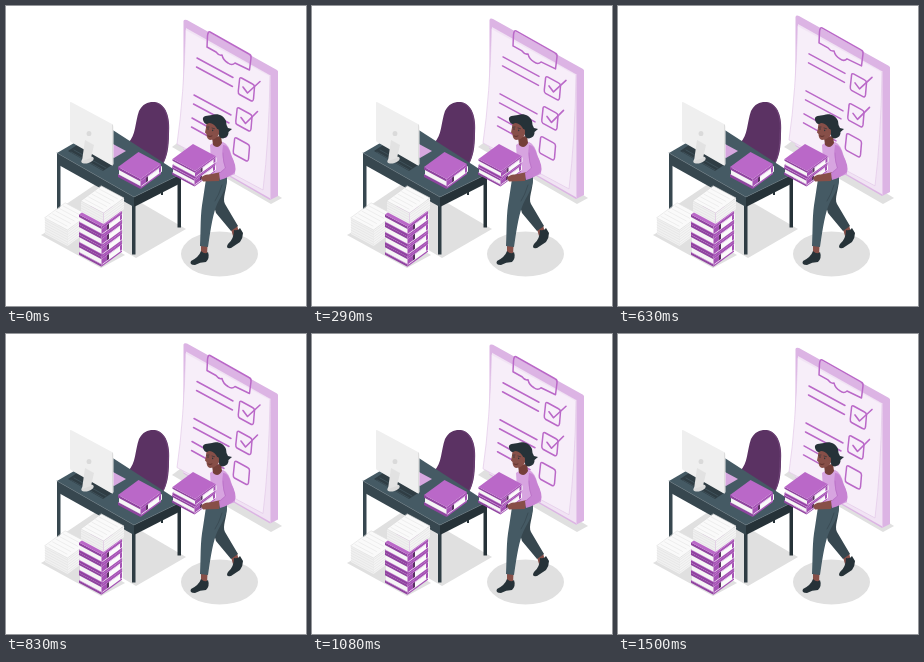
Recreate the animation shown at these times as an HTML page with a canvas. Size 300 by 300 pixels, loop 1.54 s.

```html
<!DOCTYPE html>
<html lang="en">
<head>
<meta charset="utf-8">
<title>Office tasks</title>
<style>
html, body { margin: 0; width: 100%; height: 100%; overflow: hidden; background: #fff; }
canvas { display: block; width: 100vw; height: 100vh; }
</style>
</head>
<body>
<canvas id="stage"></canvas>
<script>
const canvas = document.getElementById('stage');
const ctx = canvas.getContext('2d');
const LOOP = 1540, STEPS = 37, LIFT = 4.5;
const PURPLE = '#ba68c8', DEEP = '#8f449f', DARK = '#263238', SLATE = '#455a64';
const SKIN = '#874f48', SHADOW = '#e0e0e0';

function fill(d, color) {
  ctx.fillStyle = color;
  ctx.fill(new Path2D(d));
}

function stroke(d, color, width = 1) {
  ctx.strokeStyle = color;
  ctx.lineWidth = width;
  ctx.stroke(new Path2D(d));
}

function ellipse(x, y, rx, ry, color, turn = 0) {
  ctx.fillStyle = color;
  ctx.beginPath();
  ctx.ellipse(x, y, rx, ry, turn, 0, Math.PI * 2);
  ctx.fill();
}

// Isometric box; x, y is the left corner of its top.
function box(x, y, h, top, left, right) {
  ctx.save();
  ctx.translate(x, y);
  fill(`M0 0L22.5 12V${12 + h}L0 ${h}Z`, left);
  fill(`M22.5 12L43 -3V${h - 3}L22.5 ${12 + h}Z`, right);
  fill('M0 0L20.5 -15L43 -3L22.5 12Z', top);
  ctx.restore();
}

// Two covers with pages between them and a label on the right side.
function binder(x, y, h) {
  const cover = h * .24;
  const pages = h - cover * 2;
  box(x, y + h - cover, cover, PURPLE, DEEP, '#a552b5');
  box(x + 1, y + cover, pages, '#fff', '#f5f5f5', '#fafafa');
  ctx.save();
  ctx.translate(x, y + cover);
  fill(`M22.5 12L28 8V${8 + pages}L22.5 ${12 + pages}Z`, '#a552b5');
  fill(`M28 8L30 6.5V${6.5 + pages}L28 ${8 + pages}Z`, '#5b3263');
  fill(`M41 -1.5L43 -3V${pages - 3}L41 ${pages - 1.5}Z`, '#a552b5');
  ctx.restore();
  box(x, y, cover, PURPLE, DEEP, '#a552b5');
}

function paperStack(x, y, h) {
  box(x, y, h, '#fafafa', '#f0f0f0', '#f4f4f4');
  ctx.save();
  ctx.translate(x, y);
  for (let i = 2; i < h; i += 2.5) {
    stroke(`M0 ${i}L22.5 ${12 + i}L43 ${i - 3}`, '#dedede', .5);
  }
  stroke('M0 0L22.5 12L43 -3L20.5 -15Z', '#dedede', .6);
  for (let i = 0; i < 5; i++) {
    stroke(`M${4 + i * 3.6} ${-1.5 - i * 2.6}l18 9.6`, '#e4e4e4', .6);
  }
  ctx.restore();
}

function drawFloor() {
  fill('M178 132L276 192L265 198L166 141Z', SHADOW);
  fill('M50 205L96 174L180 223L130 252Z', SHADOW);
  fill('M35 229L60 215L119 249L95 262Z', SHADOW);
  ellipse(213.5, 248, 38.5, 22.5, SHADOW);
}

function checkBox(x, y) {
  stroke(`M${x + 3} ${y + 1}L${x + 14} ${y + 7}Q${x + 16} ${y + 8} ${x + 16} ${y + 10}` +
    `L${x + 15} ${y + 22}Q${x + 14.5} ${y + 25} ${x + 12} ${y + 23.5}` +
    `L${x + 1} ${y + 17.5}Q${x - .5} ${y + 16.5} ${x - .2} ${y + 14}` +
    `L${x + 1} ${y + 3}Q${x + 1} ${y} ${x + 3} ${y + 1}Z`, PURPLE, 1.5);
}

function drawBoard(rise) {
  ctx.save();
  ctx.translate(0, -rise);
  fill('M177.5 15Q178 13 181 14L271 64Q272.5 65 272 67V190L264 194L177.5 144Z', '#dcb4e4');
  fill('M180 22L264.5 69.5V192.5L177.5 143Z', '#f1e3f4');
  stroke('M264.5 69.5V193', '#e6c8eb', .8);
  fill('M179.5 24L264 70.5Q263 135 257 184L171 138Q178 90 179.5 24Z', '#f7eef9');
  stroke('M179.5 24Q178 90 171 138L257 184Q263 135 264 70.5', '#e3c9e9', .7);

  stroke('M204 26L243 48Q245.5 49 245 52L243.5 64L229 57' +
    'Q226 60 222 57Q217 54 216 49Q213 50 210 46L201 41L201.5 30Q202 25 204 26Z', PURPLE, 1.5);
  stroke('M191 52L227 71.5M190.5 61L226.5 80.5', PURPLE, 1.5);
  stroke('M188 89L225 109M187.5 98L223 117', PURPLE, 1.5);
  stroke('M186 112L220 131M185.5 121L218 139', PURPLE, 1.5);
  checkBox(232.5, 71);
  checkBox(230, 101);
  checkBox(227.5, 131);
  stroke('M237 81L241.5 87L254 75.5M235 111.5L239.5 117.5L251.5 105.5', PURPLE, 1.6);
  ctx.restore();
}

function drawChair() {
  fill('M122 137C130 130 129 116 133 105C137 97 143 95.5 149 96' +
    'C160 98 164.5 111 163 128C163 142 161 151 157 158L145 154Z', '#5b3263');
  stroke('M151 97C160 100 163.5 113 162 128C162 141 160 151 157 157', '#784980', .7);
}

function drawLeg(x, y, width, height, color) {
  ctx.fillStyle = color;
  ctx.fillRect(x, y, width, height);
}

function drawDesk() {
  drawLeg(155, 178, 2, 11, DARK);
  drawLeg(51, 154, 3.5, 51, '#37474f');
  drawLeg(126, 194, 3.5, 54.5, '#2f3d44');
  drawLeg(171.5, 172, 3.5, 49.5, DARK);
  fill('M51 147L128 191V201L51 158Z', '#37474f');
  fill('M128 191L175 168V177L128 201Z', DARK);
  fill('M51 147L99 119L175 168L128 191Z', SLATE);
  stroke('M175 168L128 191L51 147', '#607078', .6);
  fill('M107 138L120 145L108 152L100 148Z', '#d6a7df');
}

function drawComputer() {
  fill('M62 145L71 139L106 159L97 165Z', '#2f3d44');
  stroke('M65 146L97 164M68 144L100 162', SLATE, .7);
  ellipse(81.5, 154, 6.5, 3.2, '#dadada', -.3);
  fill('M64 97Q64 95.5 66 96.5L106 118Q107.5 119 107.5 121V158Q107 160 105 159L65 136Q64 135.5 64 134Z', '#efefef');
  stroke('M106.5 119V159', '#dddddd', 1);
  ellipse(83, 127.5, 2.4, 2.6, '#dadada');
  fill('M79 134L88 139L85 152L76 155Z', '#e2e2e2');
}

function drawPiles() {
  paperStack(39, 212, 16);
  for (let i = 3; i >= 0; i--) binder(73, 208.5 + i * 10.1, 10);
  paperStack(75, 195, 11);
}

function drawWoman() {
  // Rear leg
  fill('M224 220L231 219L233 227L227 230Z', SKIN);
  fill('M228 224Q232 225 234 222L237 227Q237 232 234 236L225 242Q219 243 222 238Q228 233 228 224Z', DARK);
  fill('M208 175L221 172C221 184 216 192 219 198L232 220L225 225L210 207L206 193Z', '#37474f');
  // Front leg
  fill('M195 237L201.5 239L201 250L195 248Z', SKIN);
  fill('M195 245Q199 249 202 246Q204 252 200 256Q194 256 189 259Q183 259 185 255Q193 251 195 245Z', DARK);
  fill('M200 173L221 169C222 183 214 190 210 201C206 212 204 228 202 241L194 240C195 222 194 209 197 193Z', SLATE);
  stroke('M216 179Q213 189 209 195', '#37474f', .7);

  // Torso and head
  fill('M204 139Q210 134 217 136Q223 138 226 151Q230 161 229 168Q221 172 206 171Z', '#d7a4e0');
  fill('M206 131L215 130L216 137Q212 144 207 139Z', '#743f39');
  fill('M200.5 117Q200 123 199 126.5L200.5 128Q200.5 133 204 134Q211 134 214 126L212 114Z', SKIN);
  fill('M197 114C196 109 202 110 206 109C212 107 218 110 220 115Q220 119 222 122L226 123L222.5 126' +
    'Q223 131 217 132.5Q212 132 213 126L210 121Q207 117 203 117Q199 120 197 114Z', DARK);
  ellipse(211.5, 125, 1.5, 2, SKIN);
  ellipse(202, 123, .6, .8, DARK);
  ellipse(206.7, 124.4, .6, .8, DARK);
  stroke('M200.8 121.2L203 121M206 122L208.5 122.7', DARK, .6);
  stroke('M202 130Q204 131.2 206 130', '#4f2825', .7);

  binder(166, 161, 7.5);
  binder(166.5, 153, 7.5);

  // Near arm
  fill('M215 166L203 168.5Q198 168 195 172L197 175.5L213 175Z', SKIN);
  fill('M217 139Q222 138 225 149Q231 160 229 166Q224 171 214 174L213 167L219 162Q215 150 217 139Z', '#c783d3');
  stroke('M217 147Q217 156 219.5 162L214 167', '#b56cc3', .6);
}

function draw(now) {
  const ratio = devicePixelRatio || 1;
  const w = Math.round(innerWidth * ratio), h = Math.round(innerHeight * ratio);
  if (canvas.width !== w || canvas.height !== h) {
    canvas.width = w;
    canvas.height = h;
  }
  ctx.setTransform(w / 300, 0, 0, h / 300, 0, 0);
  ctx.lineCap = ctx.lineJoin = 'round';
  ctx.fillStyle = '#fff';
  ctx.fillRect(0, 0, 300, 300);

  const phase = Math.floor(now % LOOP / LOOP * STEPS) / STEPS;
  drawFloor();
  drawBoard(LIFT * (1 - Math.cos(phase * Math.PI * 2)) / 2);
  drawChair();
  drawDesk();
  drawComputer();
  binder(112, 161, 10);
  drawPiles();
  drawWoman();
  requestAnimationFrame(draw);
}
draw(performance.now());
</script>
</body>
</html>
```
